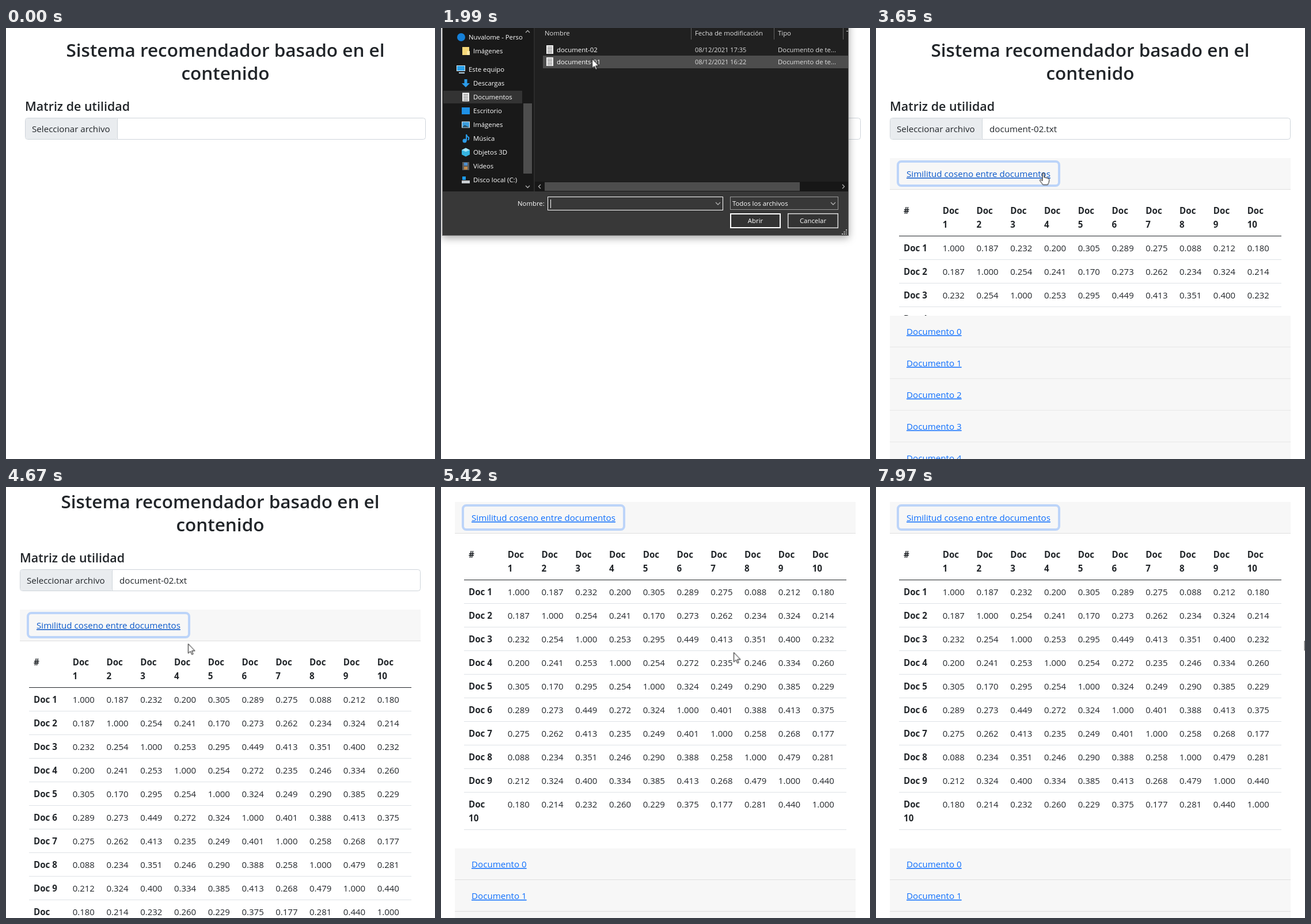
An HTML page that plays this animation: 745 px wide and 749 px high, repeating every 8000 ms.

```html
<!DOCTYPE html>
<html lang="es">
<head>
<meta charset="utf-8">
<title>Sistema recomendador</title>
<style>
html, body { margin: 0; width: 100%; height: 100%; overflow: hidden; background: #fff; }
svg { display: block; width: 745px; height: 749px; }
text { font-family: "Open Sans", "Noto Sans", sans-serif; font-size: 15.15px; fill: #212529; white-space: pre; }
.h1 { font-size: 31.5px; font-weight: 600; text-anchor: middle; }
.h4 { font-size: 21.45px; font-weight: 600; }
.b { font-weight: 700; }
.num { font-size: 14.95px; }
.link { fill: #0d6efd; text-decoration: underline 1px; }
.ring { fill: none; stroke: #0d6efd; stroke-opacity: .25; stroke-width: 4px; }
#dialog { transform-origin: 355px 110px; filter: drop-shadow(0 4px 7px rgba(0, 0, 0, .35)); }
#dialog text { font-size: 11.36px; fill: #fff; }
#dialog .head { fill: #dedede; }
#dialog .date { font-size: 11px; }
#dialog .mid { text-anchor: middle; }
.chev { fill: none; stroke: #b0b0b0; stroke-width: 1.3; }
</style>
</head>
<body>
<svg viewBox="0 0 745 749">
  <defs><clipPath id="side"><rect x="3" width="139" height="284"/></clipPath></defs>
  <g id="page">
    <g id="form">
      <text class="h1" x="381" y="50">Sistema recomendador basado en el</text>
      <text class="h1" x="381" y="90">contenido</text>
      <text class="h4" x="33" y="144">Matriz de utilidad</text>
      <rect x="33.5" y="156.5" width="695" height="37" rx="4" fill="#fff" stroke="#ced4da"/>
      <rect id="pick" x="34" y="157" width="159" height="36" rx="3" fill="#e9ecef"/>
      <path d="M193.5 157v36" stroke="#ced4da"/>
      <g id="inputRing">
        <rect x="33.5" y="156.5" width="695" height="37" rx="4" fill="none" stroke="#86b7fe"/>
        <rect class="ring" x="31" y="154" width="700" height="42" rx="6"/>
      </g>
      <text x="45" y="181">Seleccionar archivo</text>
      <text id="noFile" x="206" y="181">Ningún archivo seleccionado</text>
      <text id="file" x="206" y="181">document-02.txt</text>
    </g>
    <g id="results">
      <g id="table"></g>
      <g id="docs"><rect y="281" width="745" height="900" fill="#fff"/></g>
      <g id="top"></g>
      <rect id="linkRing" class="ring" x="38" y="232" width="280" height="42" rx="6"/>
    </g>
  </g>

  <g id="dialog">
    <rect x="2" y="-140" width="706" height="501" fill="#707070"/>
    <rect x="3" y="-139" width="704" height="499" fill="#383838"/>
    <rect x="3" y="-139" width="158" height="423" fill="#191919"/>
    <rect x="161" y="-139" width="2" height="423" fill="#2b2b2b"/>
    <rect x="163" y="-139" width="544" height="423" fill="#202020"/>
    <rect x="143" y="131" width="15" height="122" fill="#4d4d4d"/>
    <rect x="163" y="267" width="544" height="17" fill="#171717"/>
    <rect x="180" y="268" width="443" height="15" fill="#4d4d4d"/>
    <path class="chev" d="M147 8l3.5-3.5L154 8M147 274l3.5 3.5L154 274"/>
    <g id="masks" fill="#fff">
      <path d="M160-139H707V284H690V267H180V284H160z"/>
      <path d="M132 297h47v15h-47zM185 293h305v24h-305zM502 293h188v23h-188z"/>
      <path d="M502 322h88v26h-88zM602 322h88v26h-88zM690 343h17v17h-17z"/>
    </g>
    <g id="details">
      <rect x="4" y="109" width="137" height="22" fill="#333"/>
      <g id="places" clip-path="url(#side)"></g>
      <path d="M434.5 0v20M578.5 0v20M698.5 0v20" stroke="#636363"/>
      <text class="head" x="180" y="13">Nombre</text>
      <text class="head" x="441" y="13">Fecha de modificación</text>
      <text class="head" x="585" y="13">Tipo</text>
      <path d="M704 5.5h3" stroke="#dedede"/>
      <rect id="row" x="177" y="48" width="530" height="22" fill="#4d4d4d"/>
      <g id="files"></g>
      <path class="chev" d="M173 272l-3.5 3.5 3.5 3.5M697 272l3.5 3.5-3.5 3.5"/>
      <text x="133" y="309">Nombre:</text>
      <rect x="185.5" y="293.5" width="304" height="23" fill="#383838" stroke="#fff"/>
      <path id="caret" d="M190.5 298v15" stroke="#fff"/>
      <text id="chosen" x="190" y="309">document-02</text>
      <rect x="502.5" y="293.5" width="187" height="22" fill="#383838" stroke="#9b9b9b"/>
      <text x="506" y="309">Todos los archivos</text>
      <path class="chev" d="M477 303l4 4 4-4M677 303l4 4 4-4"/>
      <rect x="503" y="323" width="86" height="24" fill="#333" stroke="#fff" stroke-width="2"/>
      <rect x="602.7" y="322.7" width="86.6" height="24.6" fill="#333" stroke="#ddd" stroke-width="1.5"/>
      <text class="mid" x="546" y="339">Abrir</text>
      <text class="mid" x="646" y="339">Cancelar</text>
      <path d="M696 358h8.500M699.5 354.500h5M703 351h2" stroke="#c8c8c8" stroke-width="2" stroke-dasharray="2 1.500"/>
    </g>
  </g>

  <g id="cursor">
    <path id="arrow" d="M0 0V16.500L3.800 13 6.300 18.700 8.600 17.700 6.200 12.200H11.500z" fill="#fff" stroke="#000"/>
    <path id="ibeam" d="M-3-8h2l1 1 1-1h2M0-7V7M-3 8h2l1-1 1 1h2" fill="none" stroke="#333"/>
    <path id="hand" d="M-1.500 1q1.500-1.600 3 0v7l6 1.300q3 .8 3 3.200l-1 5-2 3.500h-8l-5.500-7.500q0-2 2-1.500l2.500 2z" fill="#fff" stroke="#000"/>
  </g>
</svg>
<script>
const LOOP = 8000, FRAME = 68, FADE = 140;
const $ = id => document.getElementById(id);
const add = (id, markup) => $(id).insertAdjacentHTML('beforeend', markup);
const label = (x, y, s, cls = '') => `<text class="${cls}" x="${x}" y="${y}">${s}</text>`;
const box = (x, y, w, h, fill) => `<rect x="${x}" y="${y}" width="${w}" height="${h}" fill="${fill}"/>`;

// Result cards
const card = (y, s, id) => box(24, y, 696, 54, '#f7f7f7') + box(24, y + 54, 696, 1, '#dfdfdf') +
  `<text id="${id}" class="link" x="53" y="${y + 33}">${s}</text>`;
add('top', card(226, 'Similitud coseno entre documentos', 'link'));
for (let i = 0; i < 10; i++) add('docs', card(281 + 55 * i, 'Documento ' + i, 'doc' + i));

// Symmetric similarity table: the decimals above the diagonal, row by row
const decimals = `187 232 200 305 289 275 088 212 180 254 241 170 273 262 234 324 214
  253 295 449 413 351 400 232 254 272 235 246 334 260 324 249 290 385 229
  401 388 413 375 258 268 177 479 281 440`.split(/\s+/);
function similarity(i, j) {
  if (i === j) return '1.000';
  const [a, b] = i < j ? [i, j] : [j, i];
  return '0.' + decimals[a * (19 - a) / 2 + b - a - 1];
}
const colX = j => 115.7 + 58.77 * j;
let cells = label(48, 323, '#', 'b') + box(40, 361, 664, 1, '#212529');
for (let i = 0; i < 10; i++) {
  const y = 388 + 41 * i;
  cells += label(colX(i), 323, 'Doc', 'b') + label(colX(i), 347, i + 1, 'b');
  cells += label(48, y, i < 9 ? 'Doc ' + (i + 1) : 'Doc', 'b');
  for (let j = 0; j < 10; j++) cells += label(colX(j), y, similarity(i, j), 'num');
  cells += box(40, i < 9 ? y + 14 : 795, 664, 1, '#dee2e6');
}
add('table', cells + label(48, 781, '10', 'b'));

// Dialog contents; icons are drawn around (0, 0)
const sheet = box(-6, -7.5, 12, 15, '#f2f2f2') +
  '<path d="M0-5V7" stroke="#777" stroke-width="8" stroke-dasharray="1 1.500"/>';
const icons = {
  cloud: '<circle r="7" fill="#1580d8"/>',
  folder: box(-6, -7, 12, 14, '#f5d778') + box(2, 0, 5, 7, '#fbe8a6'),
  pc: box(-8, -7, 15, 10, '#dceaf3') + box(-7, -6, 13, 8, '#2aa0e8') + box(-4, 5, 10, 2, '#b9d4e4'),
  down: '<path d="M-2.500-7h5v7H7L0 7-7 0h4.500z" fill="#2b9be8"/>',
  sheet,
  desk: box(-7, -6, 14, 12, '#1e90e6'),
  picture: box(-7, -5.5, 14, 11, '#e8eef2') + box(-6, -4.5, 12, 9, '#3b9ddd') +
    '<path d="M-6 4.500l4-4 8 4z" fill="#234b63"/>',
  note: '<path d="M1 4V-7q1 4 4 5 1 2-1 5" fill="none" stroke="#2b9be8" stroke-width="2"/><circle cx="-2" cy="4" r="3.500" fill="#2b9be8"/>',
  cube: '<path d="M0-7.500l7 3.500v8l-7 3.500-7-3.500v-8z" fill="#35b4e0"/><path d="M0-7.500l7 3.500-7 3-7-3z" fill="#a5e4f7"/>',
  film: box(-6, -7, 12, 14, '#5c5c5c') + box(-3, -6, 6, 5, '#4b8fd0') + box(-3, 1, 6, 5, '#c28a4a'),
  disk: box(-7, 1, 14, 5, '#c9ced2') + box(-6, -6, 6, 6, '#1e9be8')
};
const icon = (name, x, y) => `<g transform="translate(${x} ${y})">${icons[name]}</g>`;
const places = ['Nuvalome - Personal', 'Imágenes', 'Este equipo', 'Descargas', 'Documentos', 'Escritorio',
  'Imágenes', 'Música', 'Objetos 3D', 'Vídeos', 'Disco local (C:)'];
Object.keys(icons).forEach((name, i) => {
  const x = name === 'cloud' || name === 'pc' ? 48 : 56;
  const y = 16 + 24 * i + (i > 1 ? 8 : 0);
  add('places', icon(name, x - 13, y) + label(x, y + 4, places[i]));
});
['document-02 17:35', 'documents-01 16:22'].forEach((entry, i) => {
  const [name, time] = entry.split(' '), y = 42 + 21 * i;
  add('files', icon('sheet', 189, y - 4.5) + label(201, y, name) +
    label(441, y, '08/12/2021 ' + time, 'head date') + label(585, y, 'Documento de te...', 'head'));
});
// "picture" follows "desk" in the list, but the second place is a plain folder

// Motion: steps are [ms, value]; between them the picture advances once per FRAME
function track(id, prop, steps, hard) {
  const all = [[0, steps[0][1]], ...steps, [LOOP, steps.at(-1)[1]]];
  $(id).animate(all.map(([t, value], i) => {
    const span = i + 1 < all.length ? all[i + 1][0] - t : 0;
    const count = hard ? 1 : Math.max(1, Math.round(span / FRAME));
    return { offset: t / LOOP, [prop]: value, easing: `steps(${count}, end)` };
  }), { duration: LOOP, iterations: Infinity });
}
const cut = (id, prop, before, t, after) => track(id, prop, [[0, before], [t, after]], true);
const show = (id, ...times) =>
  track(id, 'opacity', [[0, 0], ...times.map((t, i) => [t, 1 - i % 2])], true);
const fade = (id, prop, off, on, ...times) => track(id, prop, times.flatMap((t, i) =>
  i % 2 ? [[t, on], [t + FADE, off]] : [[t, off], [t + FADE, on]]));
const move = (x, y) => `translate(${x}px, ${y}px)`;

track('cursor', 'transform', [
  [70, 676, 735], [620, 60, 240], [830, 110, 170], [1200, 112, 171], [1460, 224, 151],
  [1990, 262, 53], [2140, 275, 33], [2610, 275, 33], [3310, 290, 251], [4470, 290, 251],
  [4600, 316, 272], [5140, 316, 272], [5420, 508, 287], [6040, 741, 276], [6570, 741, 276],
  [7900, 740, 272], [7968, 744, 267]
].map(([t, x, y]) => [t, move(x + 0.5, y + 0.5)]));
show('arrow', 70, 2540, 2760, 3180, 4480, 6640, 7900);
show('ibeam', 2540, 2760);
show('hand', 3180, 4480);

// File picker
fade('pick', 'fill', '#e9ecef', '#dde0e3', 700, 1250, 2400, 2620);
fade('inputRing', 'opacity', 0, 1, 960, 1280, 2540, 3390);
show('noFile', 0, 2480);
show('file', 2480);
track('dialog', 'opacity', [[1390, 0], [1458, 0.59], [1520, 0.59], [1600, 1], [2400, 1], [2540, 0]]);
track('dialog', 'transform', [[1390, 0.95], [1458, 0.979], [1520, 0.979], [1640, 1], [2400, 1], [2540, 0.95]]
  .map(([t, s]) => [t, `scale(${s})`]));
show('masks', 0, 1525);
show('details', 1525);
show('row', 1900);
cut('row', 'transform', move(0, 0), 2090, move(0, -21));
cut('row', 'fill', '#4d4d4d', 2260, '#777');
show('chosen', 2260);
show('caret', 0, 2260);

// Results open, then the page scrolls
show('results', 2680);
cut('form', 'transform', move(0, 0), 2680, move(-9, 0));
fade('linkRing', 'opacity', 0, 1, 3390);
fade('link', 'fill', '#0d6efd', '#0a58ca', 3170, 4620);
track('docs', 'transform', [[3450, move(0, 0)], [3800, move(0, 547)]]);
track('page', 'transform', [[4600, move(0, 0)], [4668, move(0, -13)], [5210, move(0, -200)]]);
</script>
</body>
</html>
```
